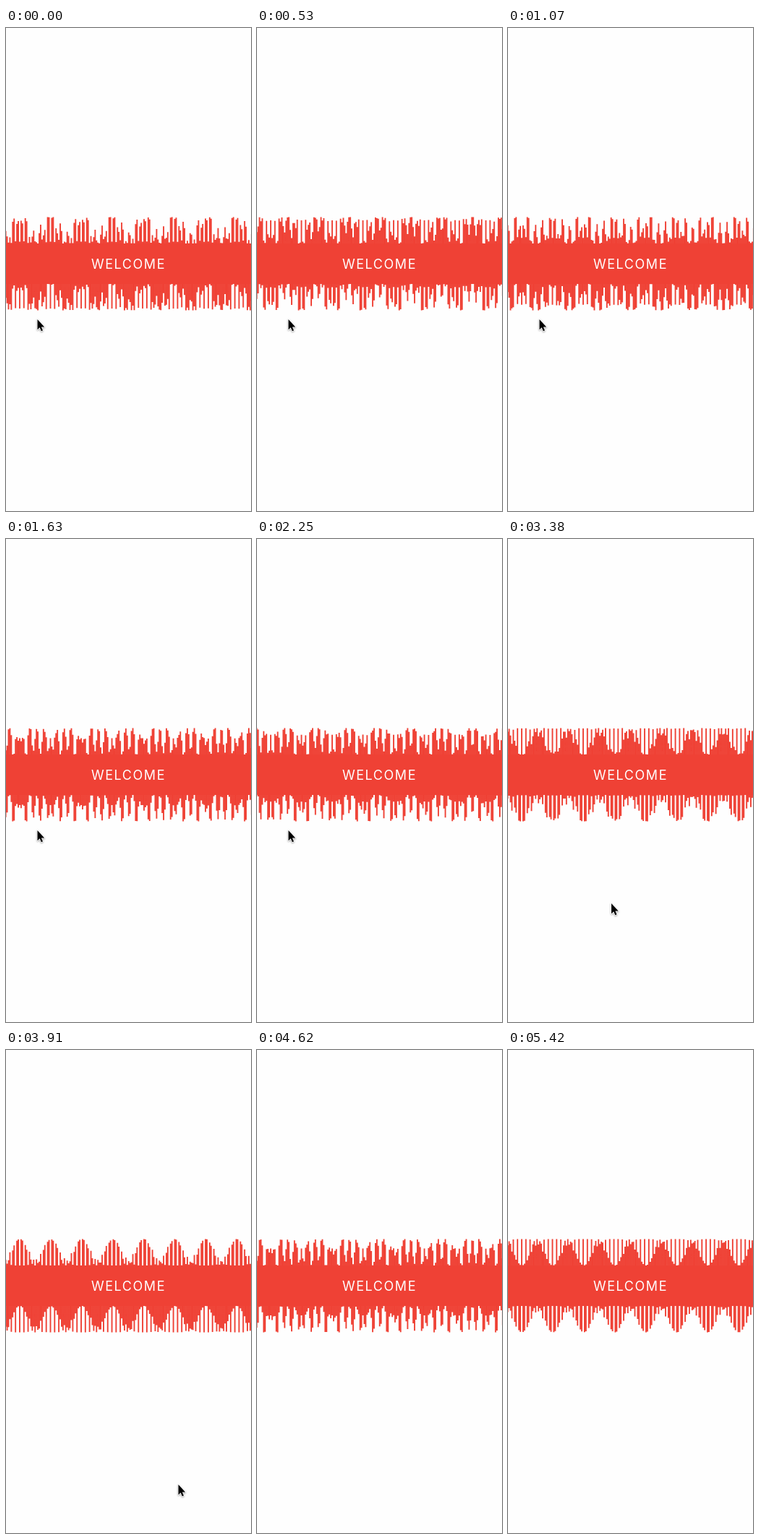
These frames come from a looping animation (339x668 px, 5470 ms). An HTML page with a canvas:

```html
<!DOCTYPE html>
<html lang="en">
<head>
<meta charset="utf-8">
<title>Welcome</title>
<style>
  html, body { margin: 0; width: 100%; height: 100%; overflow: hidden; background: #fefefe; }
  #stage { position: relative; width: 339px; height: 668px; overflow: hidden; }
  canvas { position: absolute; left: 0; top: 0; }
  #label {
    position: absolute; left: 0; top: 312px; width: 339px;
    font: 400 18px/30px Inter, "Open Sans", sans-serif;
    letter-spacing: 1.55px; text-align: center; color: #fff;
  }
  #cursor {
    position: absolute; left: -2px; top: -2px;
    filter: drop-shadow(0 1px 1px rgba(0, 0, 0, .35));
  }
</style>
</head>
<body>
<div id="stage">
  <canvas id="bars" width="339" height="668"></canvas>
  <div id="label">WELCOME</div>
  <svg id="cursor" width="16" height="22" viewBox="-2 -2 16 22">
    <path d="M0.5 0V14.2L3.7 11.2L5.8 16.2L8 15.2L5.9 10.4H10.2Z"
      fill="#000" stroke="#fff" stroke-width="1.6" paint-order="stroke" stroke-linejoin="round"/>
  </svg>
</div>
<script>
const LOOP = 5470;
const WIDTH = 339, HEIGHT = 668;
const FIRST_X = -2.3, PITCH = 1.933, BAR_WIDTH = 1.9, BAR_HEIGHT = 92.5;
const REST_TOP = 279.75, SWING = 18.25;
const PERIOD = 1000, PHASE_START = 3918;

const ctx = document.getElementById('bars').getContext('2d');
const cursor = document.getElementById('cursor');
ctx.fillStyle = '#ef4135';

// Eased progress from 0 to 1 between two times
function ease(t, from, to) {
  const p = Math.min(1, Math.max(0, (t - from) / (to - from)));
  return p * p * (3 - 2 * p);
}

// Each bar bobs with the same period, delayed by the sine of its index
function drawBars(t) {
  const turn = (t - PHASE_START) / PERIOD;
  ctx.clearRect(0, 0, WIDTH, HEIGHT);
  ctx.beginPath();
  for (let n = 0, x = FIRST_X; x < WIDTH + PITCH; n++, x += PITCH) {
    const lift = -Math.cos(2 * Math.PI * (turn - Math.sin(n)));
    ctx.rect(x - BAR_WIDTH / 2, REST_TOP - SWING * lift, BAR_WIDTH, BAR_HEIGHT);
  }
  ctx.fill();
  ctx.fillRect(0, REST_TOP + SWING, WIDTH, BAR_HEIGHT - 2 * SWING);
}

// The pointer drifts down to the right, rests, then leaves at the bottom
function moveCursor(t) {
  const drift = ease(t, 2950, 3800), leave = ease(t, 4080, 4610);
  const x = 43 + 195 * drift + 8 * leave;
  const y = 403 + 198 * drift + 70 * leave;
  cursor.style.transform = `translate(${x}px, ${y}px)`;
}

const start = performance.now();
function frame() {
  const t = (performance.now() - start) % LOOP;
  drawBars(t);
  moveCursor(t);
  requestAnimationFrame(frame);
}
frame();
</script>
</body>
</html>
```
